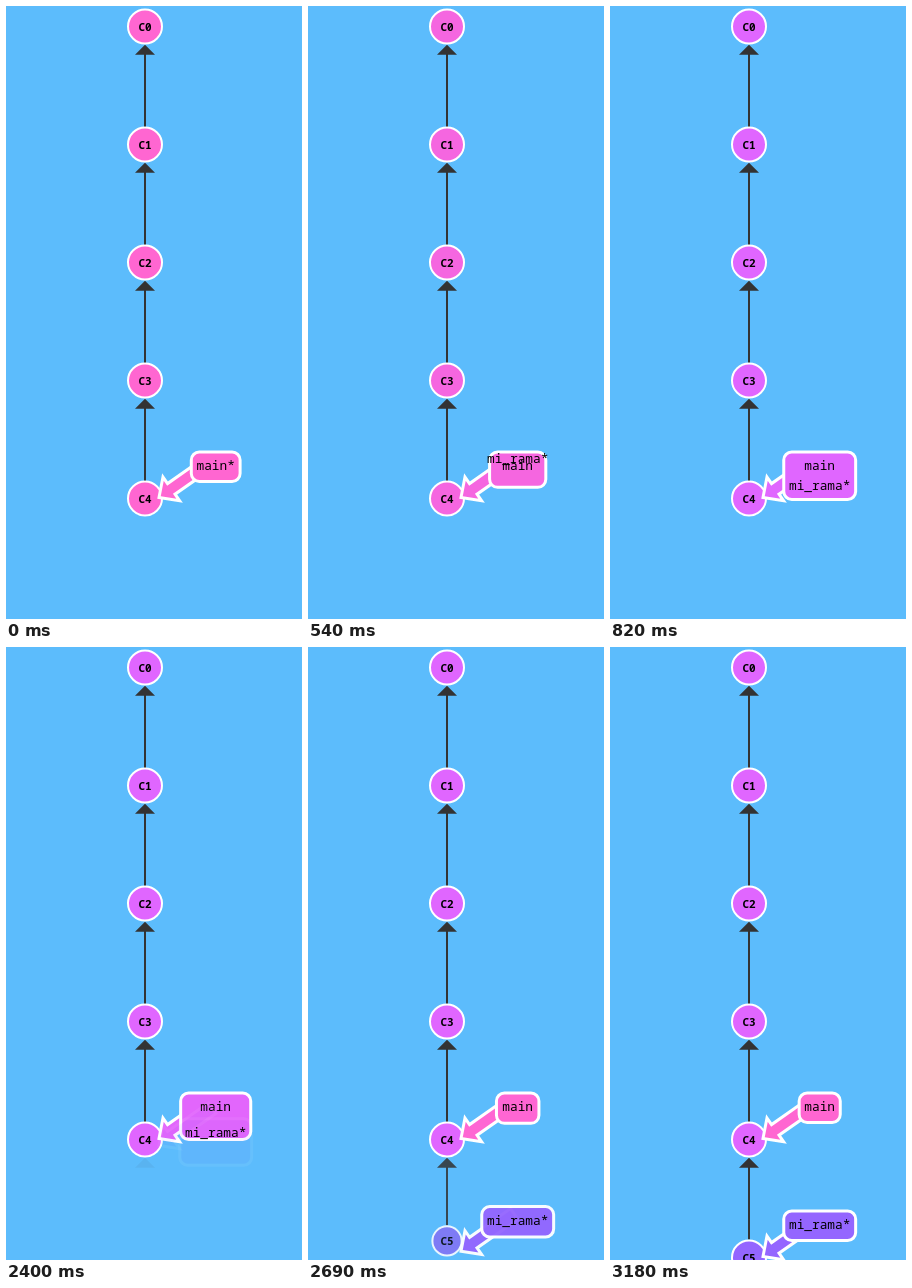
Animation, 296 px wide and 613 px high, one loop 3.77 s. Source, as an HTML page:

```html
<!DOCTYPE html>
<html lang="es">
<head>
<meta charset="utf-8">
<title>Commit graph</title>
<style>
  html, body { margin: 0; width: 100%; height: 100%; overflow: hidden; background: #5cbcfc; }
  svg { display: block; width: 296px; height: 613px; }
  text { font-family: "Noto Sans Mono", "DejaVu Sans Mono", monospace; font-size: 12.8px; text-anchor: middle; }
  circle { stroke: #fff; stroke-width: 2; }
  .label { font-size: 11px; font-weight: 600; }
  .edge line { stroke: #333; stroke-width: 2; }
  .edge path { fill: #333; }
  .tag { stroke: #fff; stroke-width: 3; }
</style>
</head>
<body>
<svg id="stage" viewBox="0 0 296 613"></svg>
<script>
const LOOP = 3770, X = 139, TOP = 20.5, GAP = 118, R = 17;
const TAG_X = 209.7, TAG_TOP = 446, LINE_H = 29.5, TWO_LINES = 47.5;
const PINK = [255, 102, 209], MIX = [224, 102, 255], PURPLE = [148, 102, 255], TEAL = [36, 179, 179];
const stage = document.getElementById('stage');

function add(name, attrs = {}, parent = stage) {
  const el = document.createElementNS('http://www.w3.org/2000/svg', name);
  set(el, attrs);
  return parent.appendChild(el);
}
function set(el, attrs) {
  for (const key in attrs) el.setAttribute(key, attrs[key]);
}
const lerp = (a, b, p) => a + (b - a) * p;
const blend = (a, b, p) => `rgb(${a.map((v, i) => Math.round(lerp(v, b[i], p)))})`;
const clamp = n => Math.min(1, Math.max(0, n));
const nodeY = i => TOP + GAP * i;
const tagWidth = chars => chars * 7.7 + 10.3;

function easeInOut(n) {
  if (n <= 0 || n >= 1) return clamp(n);
  const q = 0.48 - n / 1.04, root = Math.sqrt(0.1734 + q * q);
  const t = Math.cbrt(root - q) + Math.cbrt(-root - q) + 0.5;
  return (1 - t) * 3 * t * t + t * t * t;
}
function bounce(n) {
  const s = 7.5625, p = 2.75;
  if (n < 1 / p) return s * n * n;
  if (n < 2 / p) return s * (n - 1.5 / p) ** 2 + 0.75;
  if (n < 2.5 / p) return s * (n - 2.25 / p) ** 2 + 0.9375;
  return s * (n - 2.625 / p) ** 2 + 0.984375;
}

function makeEdge(i) {
  const g = add('g', { class: 'edge' }), y = nodeY(i) + 18.2;
  const line = add('line', { x1: X, x2: X, y1: y + 9, y2: nodeY(i + 1) - R }, g);
  add('path', { d: `M${X} ${y}l10 10h-20z` }, g);
  return { g, line };
}
function makeNode(i) {
  const g = add('g');
  const circle = add('circle', { cx: X, cy: nodeY(i), r: R }, g);
  const label = add('text', { class: 'label', x: X, y: nodeY(i) + 4 }, g);
  label.textContent = 'C' + i;
  return { g, circle, label };
}
function makeTag() {
  return {
    arrow: add('path', { class: 'tag', d: 'M0 0L15-14.5V-6.5H65V6.5H15V14.5z' }),
    box: add('rect', { class: 'tag', rx: 8 }),
    text: add('text', { x: TAG_X })
  };
}
function drawTag(tag, { tip, top, w, h, baseline, fill, opacity = 1 }) {
  set(tag.arrow, { transform: `translate(153 ${tip}) rotate(-35)`, fill, opacity });
  set(tag.box, { x: TAG_X - w / 2, y: top, width: w, height: h, fill, opacity });
  set(tag.text, { y: baseline });
}

// The newest commit lies behind the older ones.
const newEdge = makeEdge(4), newNode = makeNode(5);
for (let i = 0; i < 4; i++) makeEdge(i);
const nodes = [0, 1, 2, 3, 4].map(makeNode);
const main = makeTag(), branch = makeTag();
branch.text.textContent = 'mi_rama*';

// Motion advances in held steps of 70 ms, with one longer hold in the second act.
function elapsed(t, start, first) {
  const s = t - start;
  return s < 0 ? -1 : first + 68 * Math.floor(s / 70);
}

function draw(t) {
  const e1 = elapsed(t, 400, 21);
  const e2 = elapsed(t >= 2620 ? t - 10 : t, 2400, 68);
  const join = easeInOut(e1 / 400), split = easeInOut(e2 / 400);
  const birth = e2 < 0 ? 0 : bounce(clamp(e2 / 800));
  const joined = e1 >= 0, divided = e2 >= 0;

  const fill = blend(PINK, MIX, join);
  nodes.forEach(n => set(n.circle, { fill }));

  const y = lerp(nodeY(4), nodeY(5), birth), r = R * birth;
  set(newNode.g, { opacity: birth });
  set(newNode.circle, { cy: y, r, fill: blend(TEAL, PURPLE, birth) });
  set(newNode.label, { y: y + 4 });
  set(newEdge.g, { opacity: birth });
  set(newEdge.line, { y2: Math.max(y - r - 1, nodeY(4) + 27) });

  main.text.textContent = joined ? 'main' : 'main*';
  drawTag(main, {
    tip: 491.5, top: TAG_TOP, baseline: 464,
    w: divided ? lerp(tagWidth(8), tagWidth(4), split) : lerp(tagWidth(5), tagWidth(8), join),
    h: lerp(LINE_H, TWO_LINES, join - split),
    fill: blend(PINK, MIX, join - split)
  });

  set(branch.text, { visibility: joined ? 'visible' : 'hidden' });
  drawTag(branch, {
    tip: lerp(491.5, 609.5, split),
    top: lerp(466, 564, split),
    w: tagWidth(8),
    h: lerp(TWO_LINES, LINE_H, split),
    baseline: divided ? lerp(484, 582, split) : lerp(444, 484, join),
    fill: blend(PURPLE, PURPLE, 0),
    opacity: split
  });
}

const begin = performance.now();
function tick() {
  draw((performance.now() - begin) % LOOP);
  requestAnimationFrame(tick);
}
tick();
</script>
</body>
</html>
```
